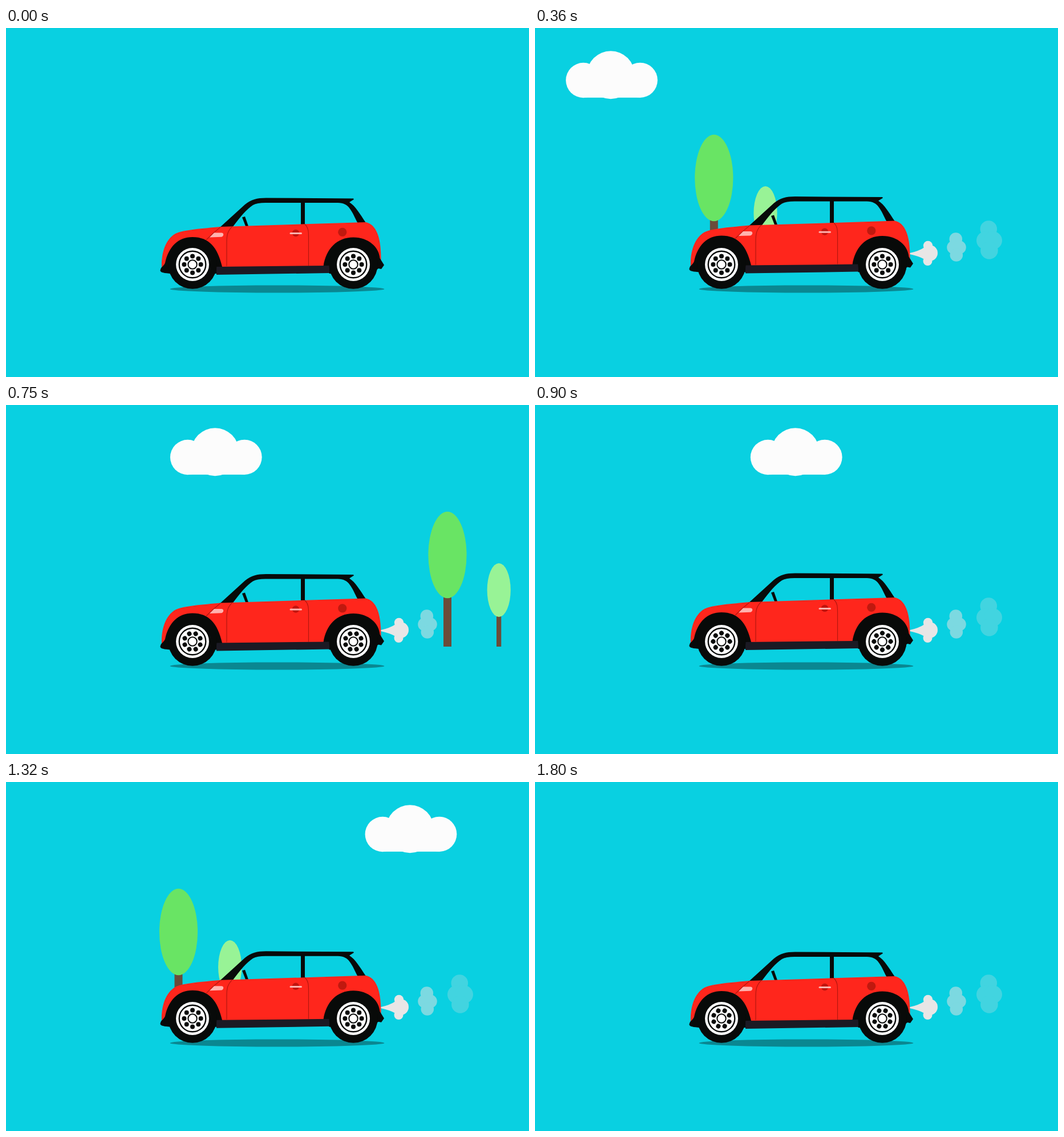
Write an HTML page that moves like this. It is 917 by 611 pixels and loops after 1830 ms.

```html
<!DOCTYPE html>
<html lang="en">
<head>
<meta charset="utf-8">
<title>Red car</title>
<style>
  html, body { margin: 0; width: 100%; height: 100%; overflow: hidden; background: #09d0e1; }
  svg { display: block; width: 100%; height: 100%; }
</style>
</head>
<body>
<svg viewBox="0 0 917 611">
  <defs>
    <clipPath id="wipe"><rect id="reveal" x="657" y="330" width="0" height="100"/></clipPath>
    <g id="rim">
      <circle r="29" fill="#fff"/>
      <circle r="23.3" fill="none" stroke="#080a09" stroke-width="2.4"/>
      <circle r="7.7" fill="none" stroke="#080a09" stroke-width="2"/>
      <g id="holes" fill="#080a09"></g>
    </g>
  </defs>

  <g id="cloud" fill="#fcfcfc">
    <circle cx="31" cy="91.5" r="30.7"/>
    <circle cx="79" cy="82.2" r="42"/>
    <circle cx="130.5" cy="91.3" r="30.6"/>
    <rect x="31" y="80" width="100" height="41.9"/>
  </g>

  <g clip-path="url(#wipe)">
    <g fill="#e8e6e6">
      <path d="M657 394Q672 391 683 384L692 394 683 405Q672 399 657 396Z"/>
      <circle cx="689" cy="381" r="8.2"/>
      <circle cx="688.5" cy="408" r="8"/>
      <circle cx="692" cy="394" r="14"/>
    </g>
    <g fill="#7cd9e1">
      <circle cx="737.8" cy="369.5" r="11.3"/>
      <circle cx="734" cy="384" r="11.8"/>
      <circle cx="744" cy="384" r="11.8"/>
      <circle cx="738.8" cy="397.5" r="11.3"/>
    </g>
    <g fill="#42d4e0">
      <circle cx="795.3" cy="352" r="14.8"/>
      <circle cx="790" cy="372" r="16"/>
      <circle cx="803" cy="372" r="16"/>
      <circle cx="796.4" cy="389.5" r="15.3"/>
    </g>
  </g>

  <g id="trees">
    <path fill="#6b4c3a" d="M-7 330H7V423H-7ZM86 365H94.3V423H86Z"/>
    <ellipse cy="262.5" rx="33.6" ry="75.7" fill="#69e464"/>
    <ellipse cx="90.2" cy="324" rx="20.6" ry="47" fill="#98f396"/>
  </g>

  <ellipse cx="475.5" cy="457" rx="188" ry="6.5" fill="#0a8791"/>

  <g id="body">
    <path fill="#080a09" fill-rule="evenodd" d="M375 349L419 309C430 300 440 297.5 456 297.5L609 298.5 610 300 602 305C613 312 620 325 631 341Z
      M397 349C411 330 422 317 433 310Q440 306 455 306H517V345Z M524 306H582C602 306 606 321 617 342L524 345Z"/>
    <path fill="#080a09" d="M414 331.5L419 330 425 347H420Z"/>
    <path fill="#ff261c" d="M273 420C272 397 278 371 297 360C312 353 345 351 376 348L631 340C649 344 658 366 657.5 406L645 422H285Z"/>
    <g fill="none" stroke="#b3160f" stroke-width="1.2">
      <path d="M351 371Q363 359 376 348.5M397 347C388 356 387 363 387 376V417M524 343.5C530 349 530.5 356 530.5 366V416"/>
    </g>
    <path fill="#ffb3af" d="M357 366.5L365 358.5H377.5C383 358.5 382 365.5 377 365.8Z"/>
    <circle cx="508" cy="359" r="6.2" fill="#c0150f"/>
    <path d="M499 359.6H517.5" stroke="#ffb3af" stroke-width="3" stroke-linecap="round"/>
    <circle cx="589.8" cy="357.3" r="7.6" fill="#c0190f"/>
    <path fill="#080a09" d="M270.5 424C272 417 277 417 279 411C285 383 302 366 327 366C356 366 371 384 379 418L369 430H290C277 429 270 428 270.5 424Z
      M556.5 417C561 387 580 366.5 609 366.5C636 366.5 654 384 655.5 403L663 415 658 422 653 421 640 430H567Z"/>
    <path fill="#1b1a24" d="M369 418L567 416V429L369 432Z"/>
  </g>

  <g fill="#080a09">
    <circle cx="327" cy="414" r="42.7"/>
    <circle cx="609" cy="414" r="42.7"/>
  </g>
  <use href="#rim" x="327" y="414"/>
  <use href="#rim" x="609" y="414"/>
</svg>
<script>
const LOOP = 1830, STEP = 30;
const $ = id => document.getElementById(id);
const [cloud, reveal, trees, body, holes] = ['cloud', 'reveal', 'trees', 'body', 'holes'].map($);
const move = (el, x, y = 0) => el.setAttribute('transform', `translate(${x} ${y})`);
const lerp = (a, b, k) => a + (b - a) * k;

for (let i = 0; i < 8; i++) {
  const a = i * Math.PI / 4;
  holes.innerHTML += `<circle cx="${14.6 * Math.sin(a)}" cy="${-14.6 * Math.cos(a)}" r="4"/>`;
}

const puffStarts = [0, 546, 1016, 1486];

function draw(now) {
  const frame = Math.floor(now % LOOP / STEP);
  const t = frame * STEP;

  move(cloud, lerp(-162, 917, t / 1800));

  // Two passes of the trees, the second one quicker.
  const pass = t < 1000 ? t / 900 : (t - 1014) / 786;
  move(trees, lerp(-111, 951, pass));

  const start = puffStarts.filter(s => s <= t).pop();
  reveal.setAttribute('width', Math.min(163, (t - start) * 0.545));

  // The body rises and sinks 3 px over 600 ms.
  move(body, 0, Math.abs(t % 600 - 300) / 100 - 3);

  holes.setAttribute('transform', `rotate(${-22.5 * Math.min(frame, 59)})`);
}

const begin = performance.now();
function tick() {
  draw(performance.now() - begin);
  requestAnimationFrame(tick);
}
tick();
</script>
</body>
</html>
```
